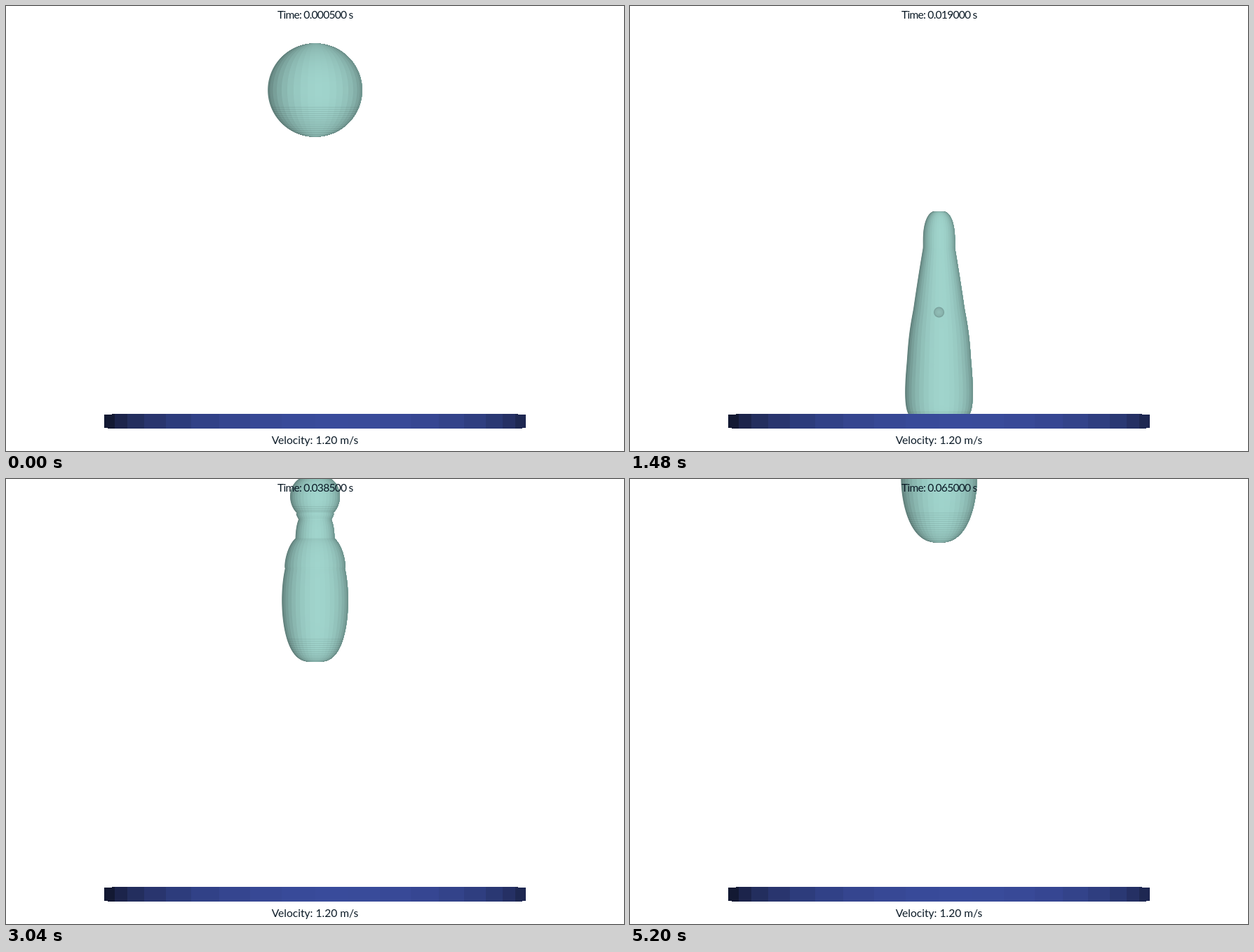
Write an HTML page with a canvas that moves like this. It is 881 px wide and 635 px high and loops after 5.24 s.

```html
<!DOCTYPE html>
<html lang="en">
<head>
<meta charset="utf-8">
<title>Drop impact</title>
<style>
html, body { margin: 0; width: 100%; height: 100%; overflow: hidden; background: #fff; }
canvas, svg { position: absolute; left: 0; top: 0; width: 881px; height: 635px; }
text { font: 15.6px Lato, "Open Sans", sans-serif; fill: #0b1a26; text-anchor: middle; }
#time { letter-spacing: -.75px; }
</style>
</head>
<body>
<canvas id="stage" width="881" height="635"></canvas>
<svg viewBox="0 0 881 635">
  <g id="plate"></g>
  <text id="time" x="440.8" y="18"></text>
  <text x="440.5" y="625">Velocity: 1.20 m/s</text>
</svg>
<script>
const STEP = 40, STEPS = 131, AXIS = 440.5, FLOOR = 583;
const IMPACT = 13.4, STRETCH = 37, LIFTED = 47, MERGED = 92, REST = 112;
const VOLUME = 405000; // sum of squared radii over the height
const RAD = Math.PI / 180, FACET = 9 * RAD, LIGHT = 6 * RAD;
const DROP = [160, 212, 204], PLATE = [57, 75, 155];
const ctx = document.getElementById('stage').getContext('2d');
const timeLabel = document.getElementById('time');

const clamp = (x, lo, hi) => Math.min(hi, Math.max(lo, x));
const tint = (rgb, k) => `rgb(${rgb.map(v => Math.round(v * k)).join()})`;
const facets = Array.from({ length: 20 }, (_, i) => {
  const from = (i - 10) * FACET, middle = clamp(from + FACET / 2, -77 * RAD, 77 * RAD);
  return { x: Math.sin(from), end: Math.sin(from + FACET), light: Math.cos(middle - LIGHT) };
});

// A smooth curve through a few [step, value] points that never overshoots.
function path(...points) {
  const last = points.length - 1;
  const slope = i => (points[i + 1][1] - points[i][1]) / (points[i + 1][0] - points[i][0]);
  const tangent = i => {
    if (i === 0 || i === last) return slope(Math.min(i, last - 1));
    const p = slope(i - 1), q = slope(i);
    return p * q > 0 ? 2 * p * q / (p + q) : 0;
  };
  return n => {
    let i = 0;
    while (i < last - 1 && n >= points[i + 1][0]) i++;
    const [n0, a] = points[i], [n1, b] = points[i + 1];
    const span = n1 - n0, t = clamp((n - n0) / span, 0, 1), d = b - a;
    const m = tangent(i) * span, k = tangent(i + 1) * span;
    return a + t * (m + t * (3 * d - 2 * m - k + t * (m + k - 2 * d)));
  };
}

// The liquid is a smooth union of lobes; each radius follows from its share of the volume.
function lobe(center, height, blunt, share, taper = 0) {
  const width = Math.sqrt(VOLUME * share * (1 + blunt) / height);
  return {
    top: center - height / 2, bottom: center + height / 2,
    radius(y) {
      const v = 2 * (y - center) / height;
      return Math.abs(v) < 1 ? width * (1 - v * v) ** blunt * (1 + taper * v) : 0;
    }
  };
}

const contactTop = path([IMPACT, 438], [20, 553], [29, 526], [STRETCH, 293], [LIFTED, 317]);
const contactBottom = path([IMPACT, FLOOR], [STRETCH, 590], [LIFTED, 507]);
const contactBlunt = path([IMPACT, .37], [20, .12], [29, .22], [STRETCH, .12], [LIFTED, .4]);
const taper = path([29, 0], [STRETCH, .55], [LIFTED, .1], [60, 0]);
const flightCenter = path([LIFTED, 412], [60, 290], [76, 173], [96, 28], [REST, -5]);
const flightBlunt = path([LIFTED, .4], [60, .5], [76, .33], [96, .22], [REST, .4]);
const headCenter = path([STRETCH, 320], [LIFTED, 234], [60, 121.5], [76, 26], [MERGED, 35]);
const headHeight = path([STRETCH, 52], [LIFTED, 112], [60, 73], [76, 64]);
const headShare = path([STRETCH, .025], [LIFTED, .16], [60, .172], [76, .14], [MERGED, 0]);
const neckCenter = path([STRETCH, 470], [60, 261.5], [76, 88], [MERGED, 80]);
const neckShare = path([STRETCH, .04], [60, .13], [76, .127], [MERGED, 0]);
const neckBlunt = path([60, .5], [76, .2]);
const lowerBubble = path([31, 520], [STRETCH, 437], [60, 282], [71, 190]);
const upperBubble = path([48, 245], [60, 131.5], [76, 16]);

function body(n, share) {
  if (n < IMPACT) return lobe(120 + 29.1 * n, 134 + .85 * n, .5 - .01 * n, share);
  if (n < LIFTED) {
    const top = contactTop(n), bottom = contactBottom(n);
    return lobe((top + bottom) / 2, bottom - top, contactBlunt(n), share, taper(n));
  }
  const height = 140 + 52 * Math.cos(2 * Math.PI * (n - REST) / 32);
  return lobe(flightCenter(n), height, flightBlunt(n), share, taper(n));
}

function liquid(n) {
  if (n < STRETCH || n >= MERGED) return [body(n, 1)];
  const head = headShare(n), neck = neckShare(n);
  return [
    body(n, 1 - head - neck),
    lobe(neckCenter(n), 79, neckBlunt(n), neck),
    lobe(headCenter(n), headHeight(n), .42, head, -.03)
  ];
}

function drawLiquid(lobes) {
  const radius = y => Math.cbrt(lobes.reduce((sum, l) => sum + l.radius(y) ** 3, 0));
  const first = Math.max(0, Math.round(Math.min(...lobes.map(l => l.top))));
  const end = Math.min(FLOOR, Math.round(Math.max(...lobes.map(l => l.bottom))));
  for (let y = first; y < end; y++) {
    const mid = y + .5, r = radius(mid);
    if (!r) continue;
    const slope = (radius(mid + 1) - radius(mid - 1)) / 2;
    const facing = .5 + .5 / Math.hypot(1, slope);
    const home = lobes.find(l => mid > l.top && mid < l.bottom);
    const low = (mid - home.top) / (home.bottom - home.top) > .68;
    const ridge = low && slope < -.3 && y % 3 === 0 ? .93 : 1;
    for (const f of facets) {
      ctx.fillStyle = tint(DROP, (.56 + .44 * f.light * facing) * ridge);
      ctx.fillRect(AXIS + r * f.x, y, r * (1 - f.x), 1);
    }
  }
}

function drawBubble(y, r) {
  const fill = ctx.createRadialGradient(AXIS, y, 0, AXIS, y, r);
  fill.addColorStop(0, '#92bfb8');
  fill.addColorStop(.7, '#89b3ad');
  fill.addColorStop(1, '#739a95');
  ctx.fillStyle = fill;
  ctx.beginPath();
  ctx.arc(AXIS, y, r, 0, 2 * Math.PI);
  ctx.fill();
}

function buildPlate() {
  const half = 300.5, top = 582.3, bottom = 603;
  const inset = x => Math.max(0, Math.abs(x - AXIS) - 285) / 15 * .7;
  document.getElementById('plate').innerHTML = facets.map(f => {
    const a = AXIS + half * f.x, b = AXIS + half * f.end;
    return `<path fill="${tint(PLATE, .12 + .88 * f.light ** .7)}" d="M${a} ${top + inset(a)}` +
      `L${b} ${top + inset(b)}V${bottom - inset(b)}L${a} ${bottom - inset(a)}Z" shape-rendering="crispEdges"/>`;
  }).join('');
}

function render(step) {
  const n = Math.min(step, REST);
  ctx.clearRect(0, 0, 881, 635);
  drawLiquid(liquid(n));
  if (n >= 31 && n <= 71) drawBubble(lowerBubble(n), 7.5 + .09 * (n - STRETCH));
  if (n >= 48 && n < 76) drawBubble(upperBubble(n), 8);
  timeLabel.textContent = `Time: ${(Math.min(step + 1, STEPS - 1) * .0005).toFixed(6)} s`;
}

buildPlate();
const start = performance.now();
let shown = -1;
function tick() {
  const step = Math.floor((performance.now() - start) / STEP) % STEPS;
  if (step !== shown) render(shown = step);
  requestAnimationFrame(tick);
}
tick();
</script>
</body>
</html>
```
